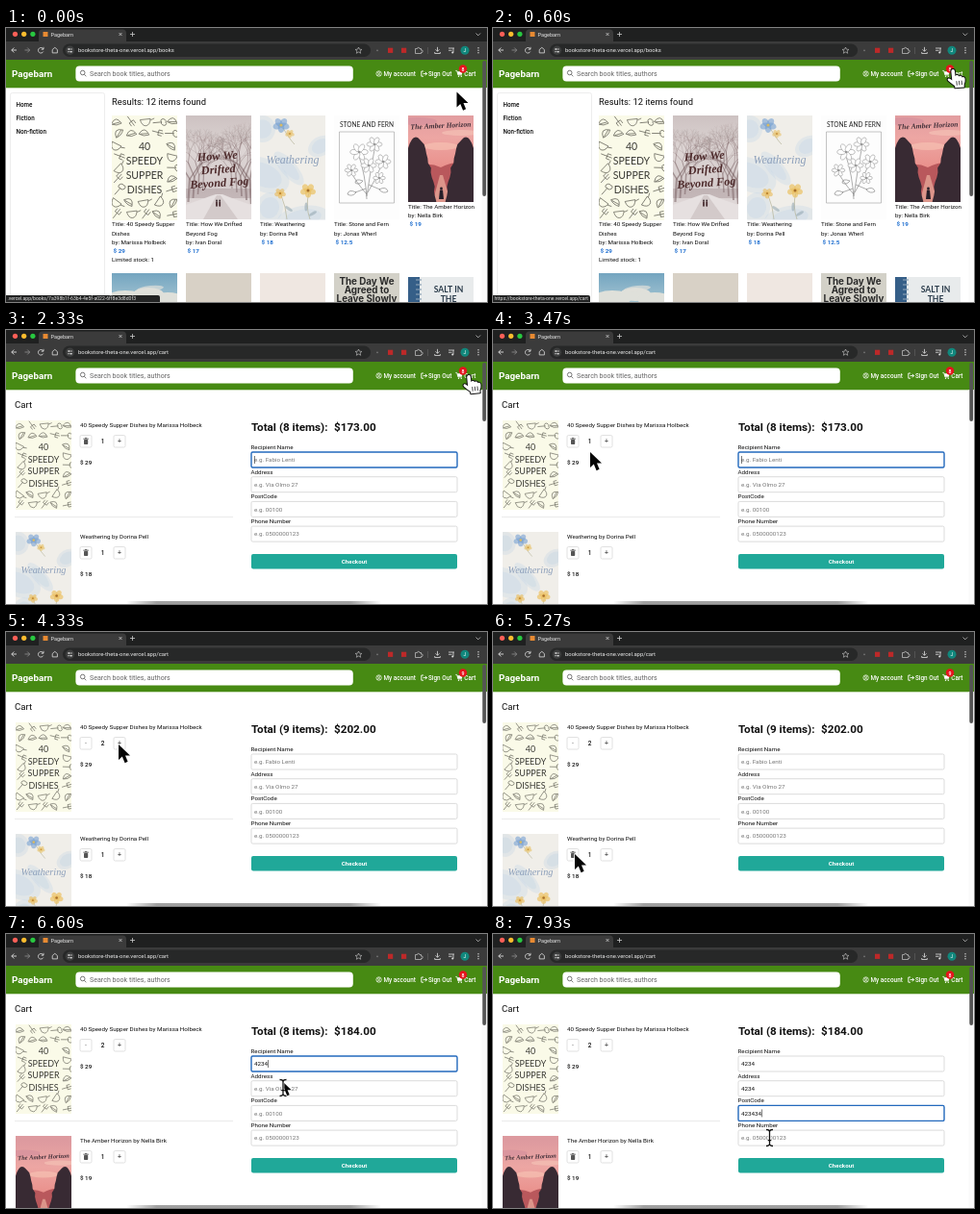
Recreate the animation shown at these times as an HTML page with a canvas. Size 500 by 285 pixels, loop 8000 ms.

```html
<!DOCTYPE html>
<html lang="en">
<head>
<meta charset="utf-8">
<title>Pagebarn</title>
<style>
html, body { margin: 0; width: 100%; height: 100%; overflow: hidden; background: #fff; }
canvas { display: block; width: 500px; height: 285px; }
</style>
</head>
<body>
<canvas id="stage"></canvas>
<script>
const W = 500, H = 285, LOOP = 8000;
const canvas = document.getElementById('stage');
const dpr = window.devicePixelRatio || 1;
canvas.width = W * dpr;
canvas.height = H * dpr;
const c = canvas.getContext('2d');

const SANS = 'Roboto, Arial, sans-serif';
const SCRIPT = '"Liberation Serif", "Noto Serif", serif';
const INK = '#0c0c0c', BLUE = '#1f6fd0';

// ---------- helpers ----------
const rnd = i => { const v = Math.sin(i * 127.1) * 43758.5453; return v - Math.floor(v); };

function text(s, x, y, size, color = INK, style = '', align = 'left', family = SANS) {
  c.font = `${style} ${size}px ${family}`;
  c.fillStyle = color;
  c.textAlign = align;
  c.fillText(s, x, y);
}
function rect(x, y, w, h, fill) { c.fillStyle = fill; c.fillRect(x, y, w, h); }
function box(x, y, w, h, r, fill, stroke, lw = 0.7) {
  c.beginPath();
  c.roundRect(x, y, w, h, r);
  if (fill) { c.fillStyle = fill; c.fill(); }
  if (stroke) { c.strokeStyle = stroke; c.lineWidth = lw; c.stroke(); }
}
function disc(x, y, r, fill) { c.beginPath(); c.arc(x, y, r, 0, 7); c.fillStyle = fill; c.fill(); }
function oval(x, y, rx, ry, a, fill) { c.beginPath(); c.ellipse(x, y, rx, ry, a, 0, 7); c.fillStyle = fill; c.fill(); }
function line(d, color, lw = 0.8) { c.strokeStyle = color; c.lineWidth = lw; c.stroke(new Path2D(d)); }
function shape(d, fill) { c.fillStyle = fill; c.fill(new Path2D(d)); }
function shade(y0, y1, ...stops) {
  const g = c.createLinearGradient(0, y0, 0, y1);
  stops.forEach((s, i) => g.addColorStop(i / (stops.length - 1), s));
  return g;
}
function at(x, y, k, draw) { c.save(); c.translate(x, y); c.scale(k, k); draw(); c.restore(); }
function clipped(w, h, draw) {
  c.save(); c.beginPath(); c.rect(0, 0, w, h); c.clip(); draw(); c.restore();
}

// ---------- covers, drawn on a 68 x 108 sheet ----------
function recipes() {
  rect(0, 0, 68, 109, '#fafae8');
  for (let i = 0; i < 45; i++) {
    const x = 6 + (i % 5) * 14, y = 6 + Math.floor(i / 5) * 12;
    if (x > 12 && x < 56 && y > 22 && y < 86) continue;
    at(x + rnd(i) * 3 - 1.5, y + rnd(i + 90) * 3 - 1.5, 1.35, () => {
      c.rotate(rnd(i + 200) * 2 - 1);
      line(['M-4 2L2 -1M2 -1a2 1.5 0 1 0 3 -1a2 1.5 0 1 0 -3 1',
            'M-4 -1H4Q3 4 0 4Q-3 4 -4 -1M4 0l3 -1',
            'M-4 2Q0 -5 4 2Q0 4 -4 2M-3 2L3 1',
            'M-4 0H1M1 -2H4M1 0H5M1 2H4M1 -2V2'][Math.floor(rnd(i + 300) * 4)], '#5c5b52', 0.5);
    });
  }
  [['40', 36], ['SPEEDY', 51], ['SUPPER', 66], ['DISHES', 81]]
    .forEach(([s, y]) => text(s, 34, y, 10.5, '#3a3a35', '', 'center', 'Lato, sans-serif'));
}

function branch(x, y, a, len, lw, seed) {
  if (len < 3) return;
  const x2 = x + Math.cos(a) * len, y2 = y + Math.sin(a) * len;
  line(`M${x} ${y}L${x2} ${y2}`, 'rgba(112,86,88,.5)', lw);
  branch(x2, y2, a - 0.25 - rnd(seed) * 0.4, len * 0.74, lw * 0.65, seed * 2 + 1);
  branch(x2, y2, a + 0.25 + rnd(seed + 7) * 0.4, len * 0.74, lw * 0.65, seed * 2 + 2);
}
function winter() {
  rect(0, 0, 68, 108, shade(0, 108, '#cdc2c2', '#ddd5d4', '#d5cccc', '#e6e0e0'));
  for (let i = 0; i < 9; i++) {
    const left = i % 2, x = left ? i * 2.5 : 68 - i * 2.5;
    branch(x, 92 - i * 2, -1.57 + (left ? 0.06 : -0.06), 25 - i, 2.4 - i * 0.18, i + 3);
  }
  rect(0, 76, 68, 10, 'rgba(135,110,112,.28)');
  shape('M0 108V93Q22 85 31 82H38Q50 87 68 93V108Z', '#e6e0e0');
  shape('M18 108L32 83H36L54 108Z', '#d3caca');
  [32, 35.2].forEach(x => { disc(x, 88.5, 0.9, '#3c2d30'); box(x - 0.9, 89.3, 1.8, 5.4, 0.7, '#4b3034'); });
  at(34, 60, 1, () => {
    c.rotate(-0.07);
    [['How We', -14], ['Drifted', 0], ['Beyond Fog', 14]].forEach(([s, y]) =>
      text(s, 0, y, 12.2, '#4d2a2b', 'italic bold', 'center', SCRIPT));
  });
}

function petals(x, y, r, petal, heart) {
  for (let i = 0; i < 5; i++) {
    const a = i * 1.257 + 0.3;
    oval(x + Math.cos(a) * r * 0.5, y + Math.sin(a) * r * 0.4, r * 0.6, r * 0.42, a, petal);
  }
  disc(x, y, r * 0.2, heart);
}
function watercolour() {
  rect(0, 0, 68, 109, '#f0eee9');
  [[3, 14, 13, 14], [63, 32, 10, 14], [4, 62, 17, 28], [45, 106, 27, 12], [30, 55, 22, 8], [10, 96, 16, 14]]
    .forEach(([x, y, a, b], i) => {
      oval(x, y, a, b, i, 'rgba(186,207,228,.28)');
      oval(x, y, a * 0.7, b * 0.7, i, 'rgba(186,207,228,.28)');
    });
  line('M24 13Q31 25 36 30M51 80Q47 94 52 108M22 83Q27 95 28 108', '#b5b39a', 0.7);
  petals(22, 10, 8, 'rgba(118,160,210,.6)', '#d8ba65');
  petals(31, 19, 4.5, 'rgba(232,196,112,.65)', '#c48c3d');
  petals(50, 78, 7.5, 'rgba(236,194,100,.7)', '#a56d2c');
  petals(21, 81, 5.5, 'rgba(234,190,98,.65)', '#b67d2e');
  [[30, 97], [48, 95], [55, 102]].forEach(([x, y], i) => oval(x, y, 4.5, 1.6, i + 0.6, 'rgba(138,160,170,.5)'));
  text('Weathering', 34, 50, 12, '#8c9fba', 'italic', 'center', SCRIPT);
}

function botanical() {
  rect(0, 0, 68, 108, '#fdfdfd');
  text('STONE AND FERN', 34, 11.5, 6.6, '#252525', '', 'center', 'Lato, sans-serif');
  box(5.5, 17, 57, 74, 0, null, '#aaa', 0.7);
  line('M34 87Q33 63 25 39M34 84Q38 56 43 30M34 82Q22 68 18 59M35 80Q44 66 50 50M33 76L22 80M36 72L48 77', '#777', 0.6);
  [[26, 38, 8], [42, 30, 7], [18, 57, 6], [51, 48, 7], [36, 52, 7], [47, 65, 5.5]].forEach(([x, y, r]) => {
    for (let i = 0; i < 6; i++) {
      c.beginPath();
      c.ellipse(x + Math.cos(i * 1.05) * r * 0.6, y + Math.sin(i * 1.05) * r * 0.6, r * 0.55, r * 0.32, i * 1.05, 0, 7);
      c.fillStyle = '#fff'; c.fill();
      c.strokeStyle = '#808080'; c.lineWidth = 0.5; c.stroke();
    }
    disc(x, y, 1.2, '#999');
  });
  line('M23 80q-8 -4 -9 2q5 3 9 -2M47 77q7 -4 9 2q-5 3 -9 -2M30 68q-8 -3 -8 2q4 3 8 -2', '#777', 0.6);
}

// A tall dark tree filling one side; mirrored for the other.
function cypress() {
  const edge = [];
  for (let i = 0; i <= 14; i++) {
    const y = 25 + i * 4.9;
    edge.push(`${12 + 17 * Math.sqrt(i / 14) + (rnd(i + 5) - 0.5) * 3} ${y}`);
  }
  shape(`M0 92V34Q4 20 10 23L${edge.join('L')}Z`, '#382a33');
}
function dusk() {
  rect(0, -16, 68, 124, shade(-10, 90, '#dd9a9f', '#eda6a3', '#e98f8a', '#cf6260'));
  oval(10, 6, 20, 4, 0, 'rgba(199,130,151,.35)');
  oval(55, 18, 20, 3, 0, 'rgba(249,206,190,.5)');
  oval(34, 32, 18, 4, 0, 'rgba(250,203,184,.55)');
  shape('M0 57Q18 46 34 54Q52 44 68 55V92H0Z', '#b9585c');
  shape('M25 92L33 62H36L45 92Z', '#dc958a');
  cypress();
  c.save(); c.translate(68, 0); c.scale(-1, 1); cypress(); c.restore();
  disc(34.5, 76, 1.4, '#261f29');
  shape('M33 77.5H36L37 87H32Z', '#261f29');
  at(34, 13, 1, () => {
    c.rotate(-0.05);
    text('The Amber Horizon', 0, 0, 7.6, '#42303a', 'italic bold', 'center', SCRIPT);
  });
}

// ---------- browser window ----------
function chrome(path) {
  rect(0, 0, W, 14, '#1f2020');
  ['#ff5f57', '#febc2e', '#28c840'].forEach((f, i) => disc(9.5 + i * 9.2, 6.3, 2.6, f));
  box(34, 1.5, 91, 16, 4, '#3b3b3b');
  rect(0, 14, W, 19, '#3b3b3b');
  rect(38.5, 4, 5, 5, '#e78a32');
  text('Pagebarn', 46.5, 8.8, 5.5, '#e8e8e8');
  line('M117.5 5l3 3m0 -3l-3 3M129 6.5h5m-2.5 -2.5v5M488.5 5.5l2.3 2.3l2.3 -2.3', '#ddd', 0.7);
  line('M11 23H5.8m2.5 -2.5l-2.5 2.5l2.5 2.5', '#ddd', 0.9);
  line('M19.5 23h5.2m-2.5 -2.5l2.5 2.5l-2.5 2.5', '#888', 0.9);
  line('M38.8 22a2.8 2.8 0 1 0 0 2.5M39 19.8v2.4h-2.4M48.2 22.5l2.6 -2.2l2.6 2.2v3.4h-5.2z', '#ddd', 0.8);
  box(59, 16.5, 320, 13.5, 6.7, '#272828');
  disc(66.5, 23.3, 4.7, '#3d3e3e');
  line('M64 22h5M64 24.7h5', '#ddd', 0.7);
  disc(65.4, 22, 0.8, '#ddd'); disc(67.7, 24.7, 0.8, '#ddd');
  text('bookstore-theta-one.vercel.app/' + path, 75, 25.3, 5.9, '#ececec');
  line('M366.5 20l1 2.2l2.4 .2l-1.8 1.5l.6 2.4l-2.2 -1.3l-2.2 1.3l.6 -2.4l-1.8 -1.5l2.4 -.2z', '#ccc', 0.6);
  disc(386, 23.3, 0.9, '#777');
  rect(397, 20.7, 5.2, 5.2, '#bd2929');
  rect(411, 20.7, 5.2, 5.2, '#bd2929');
  line('M425.5 21.5h2a1.2 1.2 0 1 1 2.4 0h1.6v1.6a1.2 1.2 0 1 1 0 2.2v1.2h-6z', '#ccc', 0.7);
  line('M438.5 20v7', '#666', 0.6);
  line('M448.5 19.8v4.5m-2 -2l2 2l2 -2M445.7 25v1.5h5.6v-1.5M460 21h6M460 23.3h3.5M465 21v4.5', '#ddd', 0.8);
  disc(464.2, 25.5, 1, '#ddd');
  disc(477, 23.3, 4.5, '#11877c');
  text('J', 477, 25.3, 5, '#fff', '', 'center');
  [20.8, 23.3, 25.8].forEach(y => disc(491, y, 0.7, '#ddd'));
}

function header(count) {
  rect(0, 33, W, 29.3, '#478a13');
  text('Pagebarn', 6, 51, 9.8, '#fff', 'bold');
  box(72.4, 39.4, 288.4, 16.2, 4, '#fff');
  line('M82 46.5a2.3 2.3 0 1 1 -4.6 0a2.3 2.3 0 1 1 4.6 0M81.4 48.3l2 2', '#555', 0.8);
  text('Search book titles, authors', 87, 50, 7.1, '#666');
  line('M390.3 47.5a2.7 2.7 0 1 1 -5.4 0a2.7 2.7 0 1 1 5.4 0M385.8 49.4q1.8 -1.8 3.6 0M388.6 46.7a1 1 0 1 1 -2 0a1 1 0 1 1 2 0', '#fff', 0.7);
  text('My account', 392.5, 50, 6.4, '#fff', '500');
  line('M434 45h-2.2v5.2h2.2M433.5 47.6h4m-1.7 -1.8l1.8 1.8l-1.8 1.8', '#fff', 0.9);
  text('Sign Out', 439, 50, 6.4, '#fff', '500');
  shape('M469 45.2H474.6L473.8 48.4H469.8Z', '#fff');
  line('M467.3 44.4h1.4l1.2 4.5h3.8', '#fff', 0.8);
  disc(470.5, 50.3, 0.7, '#fff'); disc(473.3, 50.3, 0.7, '#fff');
  text('Cart', 476.3, 50, 6.4, '#fff', '500');
  disc(475, 42.5, 4.2, '#e5141d');
  text(count, 475, 44.5, 5.3, '#fff', '500', 'center');
}

function scrollbar(len) {
  rect(494.5, 62.3, 5.5, 223, '#fafafa');
  box(495.3, 34, 3.8, len, 1.9, '#555');
}

function status(s, w) {
  box(-3, 278, w + 3, 10, 2, '#222323');
  text(s, 1.5, 283.4, 5.08, '#e2e2e2');
}

// ---------- pages ----------
const BOOKS = [
  [recipes, 109, ['Title: 40 Speedy Supper', 'Dishes', 'by: Marissa Holbeck'], 29, 'Limited stock: 1'],
  [winter, 108, ['Title: How We Drifted', 'Beyond Fog', 'by: Ivan Doral'], 17],
  [watercolour, 108.5, ['Title: Weathering', 'by: Dorina Pell'], 18],
  [botanical, 108, ['Title: Stone and Fern', 'by: Jonas Wherl'], 12.5],
  [dusk, 90, ['Title: The Amber Horizon', 'by: Nella Birk'], 19]
];

function shop() {
  box(4.5, 67.5, 98, 225, 2, '#fff', '#e6e6e6');
  ['Home', 'Fiction', 'Non-fiction'].forEach((s, i) => text(s, 10.5, 82.3 + i * 14, 6.3, INK, '500'));
  text('Results: 12 items found', 110, 80, 9.35);
  BOOKS.forEach(([art, h, lines, price, note], i) => {
    const x = 110 + i * 77;
    at(x, 91, 1, () => clipped(68, h, art));
    let y = h < 100 ? 188 : 206.3;
    lines.forEach(s => { text(s, x, y, 6.25); y += 9.2; });
    text('$ ' + price, x + 1.5, y, 6.25, BLUE, 'bold');
    if (note) text(note, x, y + 9.2, 6.25);
  });
  at(110, 255, 1, () => clipped(68, 30, () => {
    rect(0, 0, 68, 30, shade(0, 30, '#74a5c0', '#a3c4d2'));
    [[14, 26, 20, 8], [38, 22, 16, 7], [58, 27, 18, 7]].forEach(([x, y, a, b]) => oval(x, y, a, b, 0, '#dfe0da'));
    oval(40, 16, 14, 3, -0.1, 'rgba(223,224,218,.7)');
  }));
  rect(187, 255, 68, 30, '#d8d1c6');
  rect(264, 255, 68, 30, '#efe7e1');
  rect(341, 255, 68, 30, '#d3d1c8');
  ['The Day We', 'Agreed to', 'Leave Slowly'].forEach((s, i) =>
    text(s, 375, 266.5 + i * 9.3, 9.8, '#2a2a2a', 'bold', 'center', 'Inter, sans-serif'));
  rect(418, 259, 68, 26, '#e8ebec');
  rect(418, 259, 12, 26, '#365f88');
  for (let y = 262; y < 285; y += 5) line(`M426 ${y}h6`, '#879fb5', 1.2);
  ['SALT IN', 'THE'].forEach((s, i) =>
    text(s, 460, 275 + i * 9.5, 8.6, '#2b3c4b', 'bold', 'center', 'Lato, sans-serif'));
  scrollbar(141);
}

const RECIPES = { title: '40 Speedy Supper Dishes by Marissa Holbeck', price: 29, art: recipes, dy: 0 };
const PAINT = { title: 'Weathering by Dorina Pell', price: 18, art: watercolour, dy: 0 };
const DUSK = { title: 'The Amber Horizon by Nella Birk', price: 19, art: dusk, dy: 15 };

function cartItem(y, item, qty) {
  at(10, y, 58 / 68, () => clipped(68, 109, () => { c.translate(0, item.dy); item.art(); }));
  text(item.title, 77, y + 6.8, 6.25);
  box(77, y + 15.5, 12, 12.5, 1.5, '#fff', '#d5d5d5');
  box(112, y + 15.5, 12, 12.5, 1.5, '#fff', '#d5d5d5');
  if (qty > 1) text('-', 83, y + 24, 7, '#777', '', 'center');
  else {
    box(81, y + 20, 4.2, 5, 0.7, '#555');
    line(`M80.3 ${y + 19.2}h5.6M82 ${y + 18.4}h2.2`, '#444', 0.8);
  }
  text(qty, 100.5, y + 24.2, 6.4, INK, '500', 'center');
  text('+', 118, y + 24, 7, '#333', '', 'center');
  text('$ ' + item.price, 77, y + 45.7, 6.25, INK, '500');
}

const ADD = 4200, REMOVE = 5480;
const FIELDS = [
  { label: 'Recipient Name', hint: 'Fabio Lenti', y: 127, value: '4234', focus: 6080, type: 6150, pace: 85 },
  { label: 'Address', hint: 'Via Olmo 27', y: 152.7, value: '4234', focus: 6750, type: 6830, pace: 75 },
  { label: 'PostCode', hint: '00100', y: 178.4, value: '423434', focus: 7230, type: 7330, pace: 80 },
  { label: 'Phone Number', hint: '0500000123', y: 204.1, value: '', focus: 9000, type: 9000, pace: 80 }
];

function cart(t) {
  const count = t >= ADD && t < REMOVE ? 9 : 8;
  const total = t < ADD ? 173 : t < REMOVE ? 202 : 184;
  text('Cart', 9, 81.2, 9.6);
  cartItem(94, RECIPES, t < ADD ? 1 : 2);
  line('M9 194.5H236', '#e6e6e6', 0.8);
  cartItem(210, t < REMOVE ? PAINT : DUSK, 1);
  text(`Total (${count} items):`, 255, 104.5, 11.7, '#111', 'bold');
  text(`$${total}.00`, 341, 104.5, 11.7, '#111', 'bold');

  let active = t < ADD ? 0 : -1;
  FIELDS.forEach((f, i) => { if (t >= f.focus) active = i; });
  FIELDS.forEach((f, i) => {
    const n = Math.max(0, Math.min(f.value.length, Math.floor((t - f.type) / f.pace) + 1));
    const typed = f.value.slice(0, n), on = i === active;
    text(f.label, 254.5, f.y - 3, 6.25);
    box(255, f.y, 214, 16, 1.5, '#fff', on ? '#2369bd' : '#d2d2d2', on ? 1.4 : 0.8);
    text(typed || 'e.g. ' + f.hint, 258, f.y + 10.3, 6.25, typed ? INK : '#777');
    if (on) {
      const x = 258.5 + (typed ? c.measureText(typed).width : 0);
      line(`M${x} ${f.y + 4}v8`, '#222', 0.6);
    }
  });
  box(255, 233, 214, 15.5, 2, '#20a899');
  text('Checkout', 362, 243, 6.2, '#fff', 'bold', 'center');

  const g = c.createLinearGradient(125, 0, 390, 0);
  ['rgba(110,110,110,0)', 'rgba(110,110,110,.65)', 'rgba(110,110,110,.65)', 'rgba(110,110,110,0)']
    .forEach((s, i) => g.addColorStop([0, 0.12, 0.88, 1][i], s));
  rect(125, 282, 265, 3, g);
  scrollbar(61);
}

// ---------- pointer ----------
const PATH = [
  [0, 468.5, 66.5], [120, 469, 65], [450, 478, 43.5], [1000, 478, 43.5], [1500, 482.5, 47], [2300, 482.5, 47],
  [3100, 112, 132], [3470, 101, 127], [3950, 117, 117], [4500, 117, 117], [5200, 85, 231], [5600, 85, 231],
  [6050, 286, 135], [6400, 286, 135], [6600, 288, 160], [7000, 288, 160], [7200, 288, 186],
  [7650, 288, 186], [7920, 287.5, 212], [8000, 287.5, 212]
];
function pointer(t) {
  const i = PATH.findIndex(p => p[0] > t);
  const [t0, x0, y0] = PATH[i - 1], [t1, x1, y1] = PATH[i];
  const k = (t - t0) / (t1 - t0), e = k * k * (3 - 2 * k);
  return [x0 + (x1 - x0) * e, y0 + (y1 - y0) * e];
}
function outlined(d, fill, edge, lw) {
  const p = new Path2D(d);
  c.lineJoin = 'round';
  c.strokeStyle = edge; c.lineWidth = lw; c.stroke(p);
  c.fillStyle = fill; c.fill(p);
  c.lineJoin = 'miter';
}
const arrow = () => outlined('M0 0V16L3.8 12.6L6.6 19.2L9.6 17.8L7 11.5H12Z', '#050505', '#fff', 1.5);
function hand() {
  c.rotate(-0.1);
  outlined('M-1.8 1.5Q-1.8 -.5 0 -.5Q1.8 -.5 1.8 1.5V7Q2.2 6 3.7 6Q5.3 6 5.4 7.5Q6 6.8 7.2 7Q8.7 7.2 8.8 8.8Q9.6 8.2 10.7 8.8Q11.7 9.5 11.6 11Q11.6 14 10 16.5V19H.5V17Q-3 14 -6 10.8Q-7 9 -5.4 8.5Q-4 8.3 -1.8 11Z', '#fff', '#111', 2);
  line('M2.7 12v4.5M5.3 12v4.5M7.9 12v4.5', '#222', 0.8);
}
function ibeam() {
  const d = 'M-3.5 -8.5Q-.5 -8.5 0 -6.7Q.5 -8.5 3.5 -8.5M0 -7V7M-3.5 8.5Q-.5 8.5 0 6.7Q.5 8.5 3.5 8.5M-1.8 2.6H1.8';
  line(d, '#fff', 2.6);
  line(d, '#111', 1.3);
}

// ---------- play ----------
const OPEN_CART = 2200;
function draw(t) {
  const inCart = t >= OPEN_CART;
  const [x, y] = pointer(t);
  const onLink = x > 465 && y < 55;
  const onField = inCart && x > 255 && x < 469 && FIELDS.some(f => y > f.y && y < f.y + 16);
  const crossing = t > 6550 && t < 6630;

  c.setTransform(dpr, 0, 0, dpr, 0, 0);
  rect(0, 0, W, H, '#fff');
  chrome(inCart ? 'cart' : 'books');
  header(t >= ADD && t < REMOVE ? 9 : 8);
  if (inCart) cart(t);
  else {
    shop();
    if (onLink) status('https://bookstore-theta-one.vercel.app/cart', 101);
    else status('.vercel.app/books/7a398b1f-63b4-4e5f-a022-6ff8e3d8d0f3', 160);
  }
  if (crossing) at(x - 1, y - 7, 0.8, arrow);
  at(x, y, 1, onLink ? hand : onField ? ibeam : arrow);
}

const start = performance.now();
function tick() {
  draw((performance.now() - start) % LOOP);
  requestAnimationFrame(tick);
}
tick();
</script>
</body>
</html>
```
